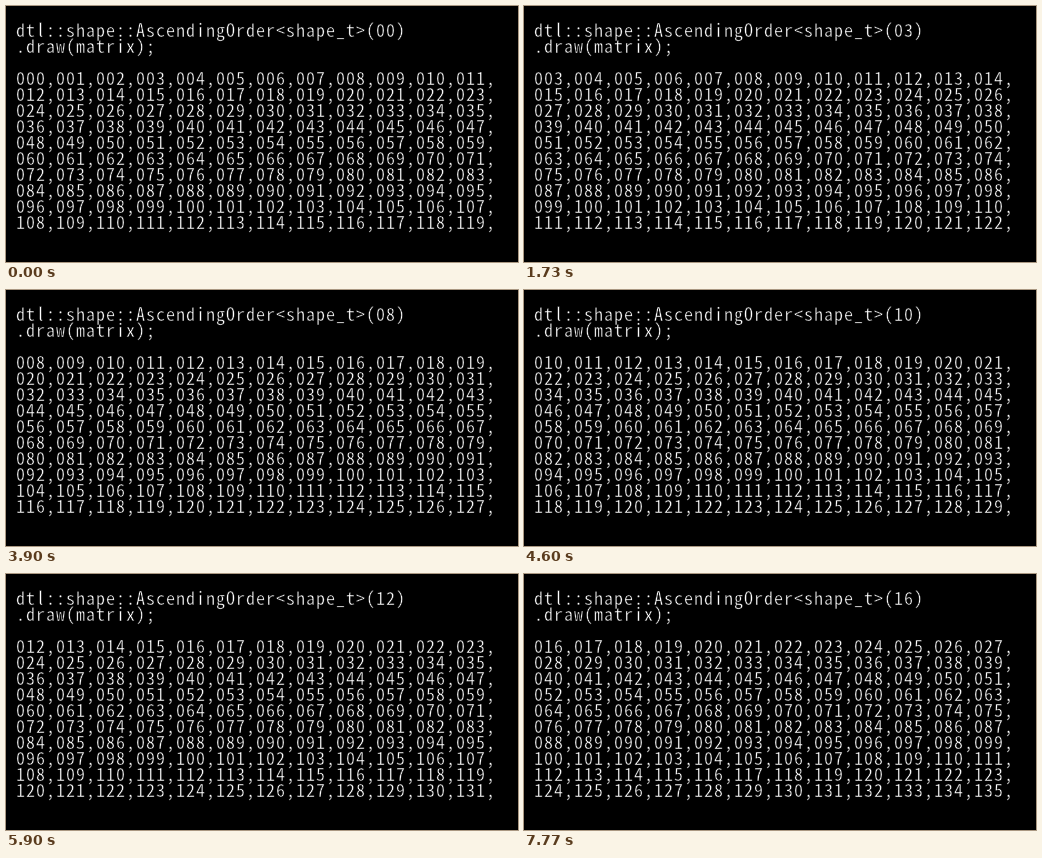
An HTML page with a canvas that plays this animation: 512 by 256 pixels, repeating every 8 s.

```html
<!DOCTYPE html>
<html lang="en">
<head>
<meta charset="utf-8">
<title>Ascending order matrix</title>
<style>
  html, body { margin: 0; width: 100%; height: 100%; overflow: hidden; background: #000; }
  canvas { display: block; }
</style>
</head>
<body>
<canvas id="stage" width="512" height="256"></canvas>
<script>
const LOOP = 8000;
const COLUMNS = 12, ROWS = 10;
const CELL = 10, LINE = 16;
const FIRST_X = 14.5, FIRST_BASELINE = 31;

// Start time of each count from 0 to 16.
const STARTS = [0, 530, 970, 1470, 1970, 2100, 2600, 3100, 3630,
                4100, 4600, 5100, 5630, 6130, 6670, 7130, 7630];

const MONO = '18px "Noto Sans Mono CJK JP", "Noto Sans CJK JP", "Liberation Mono", monospace';
const PLAIN = '18px "Noto Sans CJK JP", "Liberation Sans", sans-serif';

const ctx = document.getElementById('stage').getContext('2d');
const pad = (number, width) => String(number).padStart(width, '0');

function matrixRow(first) {
  return Array.from({ length: COLUMNS }, (_, i) => pad(first + i, 3) + ',').join('');
}

function textLines(start) {
  return [
    `dtl::shape::AscendingOrder<shape_t>(${pad(start, 2)})`,
    '.draw(matrix);',
    '',
    ...Array.from({ length: ROWS }, (_, row) => matrixRow(start + row * COLUMNS))
  ];
}

// Every character sits in the middle of a fixed-width cell;
// the black outline thins its strokes to about one pixel.
function drawLine(text, line) {
  const y = FIRST_BASELINE + line * LINE;
  [...text].forEach((char, i) => {
    const x = FIRST_X + i * CELL;
    ctx.font = char === 'l' ? PLAIN : MONO;
    ctx.fillText(char, x, y);
    ctx.strokeText(char, x, y);
  });
}

function draw(start) {
  ctx.fillStyle = '#000';
  ctx.fillRect(0, 0, 512, 256);
  ctx.fillStyle = '#fff';
  ctx.strokeStyle = '#000';
  ctx.lineWidth = 0.4;
  ctx.lineJoin = 'round';
  ctx.textAlign = 'center';
  ctx.textBaseline = 'alphabetic';
  textLines(start).forEach(drawLine);
}

let shown = -1;

function tick() {
  const time = performance.now() % LOOP;
  const start = STARTS.filter(t => t <= time).length - 1;
  if (start !== shown) draw(shown = start);
  requestAnimationFrame(tick);
}

tick();
</script>
</body>
</html>
```
